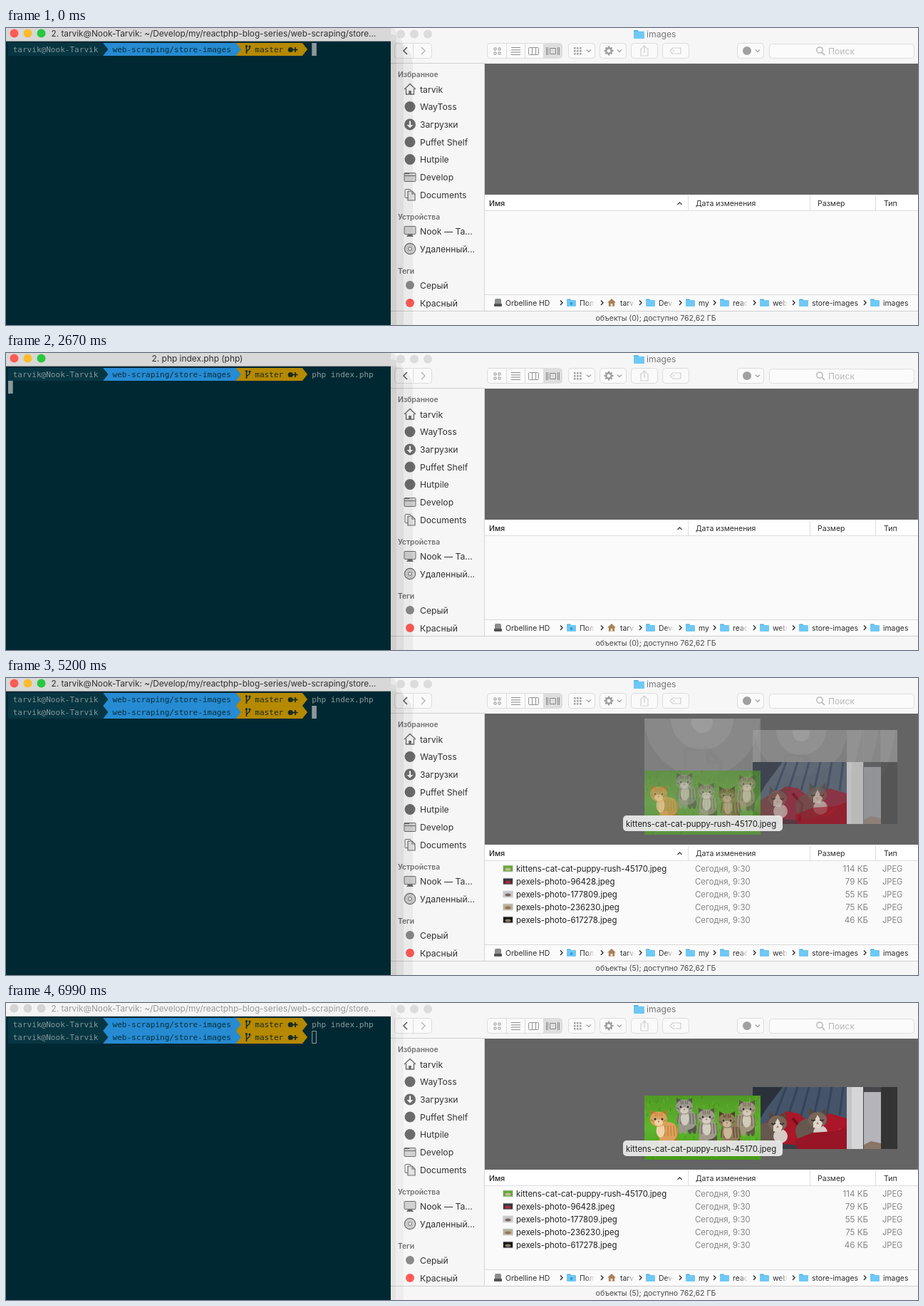
These frames come from a looping animation (1280x417 px, 7.09 s). An HTML page with a canvas:

```html
<!DOCTYPE html>
<html lang="ru">
<head>
<meta charset="utf-8">
<title>Terminal and file list</title>
<style>
  html, body { margin: 0; width: 100%; height: 100%; overflow: hidden; background: #f6f6f6; }
  canvas { display: block; width: 1280px; height: 417px; }
</style>
</head>
<body>
<canvas id="stage" width="1280" height="417"></canvas>
<script>
const ctx = document.getElementById('stage').getContext('2d');
const LOOP = 7090, CELL = 6.66, TAU = Math.PI * 2;
const UI = 'Inter, "Open Sans", sans-serif';
const MONO = '11.06px "DejaVu Sans Mono", monospace';
const ICON = '#6c6c6c', FAINT = '#a6a6a6';
const USER = 'tarvik', HOST = 'Nook-Tarvik';
const PATH_TITLE = `2. ${USER}@${HOST}: ~/Develop/my/reactphp-blog-series/web-scraping/store…`;

// Latest value whose start time has passed
const at = (t, steps) => steps.filter(([start]) => t >= start).pop()[1];

function rect(x, y, w, h, fill, stroke, r = 0) {
  ctx.beginPath();
  ctx.roundRect(x, y, w, h, r);
  paint(fill, stroke);
}
function paint(fill, stroke, width = 1) {
  if (fill) { ctx.fillStyle = fill; ctx.fill(); }
  if (stroke) { ctx.strokeStyle = stroke; ctx.lineWidth = width; ctx.stroke(); }
}
function oval(x, y, rx, ry, fill, stroke, width) {
  ctx.beginPath();
  ctx.ellipse(x, y, rx, ry, 0, 0, TAU);
  paint(fill, stroke, width);
}
const disc = (x, y, r, fill, stroke, width) => oval(x, y, r, r, fill, stroke, width);
function trace(points) {
  ctx.beginPath();
  for (let i = 0; i < points.length; i += 2) ctx.lineTo(points[i], points[i + 1]);
}
function line(color, width, ...points) { trace(points); paint(null, color, width); }
function shape(fill, ...points) { trace(points); ctx.closePath(); paint(fill); }
function text(str, x, y, size, color = '#2b2b2b', align = 'left', weight = 400) {
  ctx.font = `${weight} ${size}px ${UI}`;
  ctx.fillStyle = color;
  ctx.textAlign = align;
  ctx.fillText(str, x, y);
}
function mono(str, col, y, color) {
  ctx.font = MONO;
  ctx.fillStyle = color;
  ctx.textAlign = 'left';
  ctx.fillText(str, 3 + col * CELL, y);
}
function clipped(x, y, w, h, draw) {
  ctx.save();
  ctx.beginPath();
  ctx.rect(x, y, w, h);
  ctx.clip();
  draw();
  ctx.restore();
}
function faded(alpha, draw) {
  ctx.save();
  ctx.globalAlpha *= alpha;
  draw();
  ctx.restore();
}

/* ---------- terminal ---------- */
function prompt(y) {
  const mid = y + 9, base = y + 13;
  const segment = (from, to, fill) => {
    const a = 3 + from * CELL, b = 3 + to * CELL;
    shape(fill, a, y, b, y, b + CELL + 0.5, mid, b, y + 18, a, y + 18);
  };
  segment(47, 62, '#b58900');
  segment(19, 48, '#268bd2');
  segment(0, 20, '#073642');
  mono(`${USER}@${HOST}`, 1, base, '#839496');
  mono('web-scraping/store-images', 22, base, '#052f3d');
  mono('master', 52, base, '#1b2b22');
  line('#1b2b22', 1.6, 337.5, y + 4, 337.5, y + 15);
  line('#1b2b22', 1.4, 342, y + 5, 342, y + 8, 337.5, y + 12);
  disc(337.5, y + 4.5, 1.6, '#1b2b22');
  disc(342, y + 5, 1.6, '#1b2b22');
  disc(399.3, mid + 0.5, 3.6, '#1b2b22');
  line('#1b2b22', 1.8, 402, mid + 0.5, 409.5, mid + 0.5);
  line('#1b2b22', 1.8, 406, mid - 3, 406, mid + 4);
}

function terminal(t) {
  const active = t < 6990, running = t >= 1780, done = t >= 4760;
  rect(0, 0, 540, 417, '#002833');
  rect(0, 0, 540, 18, active ? '#d8d8d8' : '#f4f4f4');
  rect(0, 18, 540, 1, active ? '#8f9a9c' : '#c3c9ca');
  ['#ff5b54', '#fdbc2d', '#28c83f'].forEach((c, i) =>
    disc(11.5 + i * 19, 7.5, 6, active ? c : '#d5d5d5'));

  const title = at(t, [[0, PATH_TITLE], [1780, '2. php index.php (zsh)'],
    [2670, '2. php index.php (php)'], [4310, PATH_TITLE]]);
  const ink = active ? '#303030' : '#9a9a9a';
  if (title === PATH_TITLE) text(title, 63.5, 12, 11.8, ink);
  else text(title, 268.5, 12, 11.9, ink, 'center');

  const typed = at(t, [[0, ''], [600, 'p'], [740, 'ph'], [890, 'php '],
    [1180, 'php in'], [1330, 'php index.php ']]);
  prompt(21);
  mono(typed, 64, 34, '#8d9c9c');
  if (done) prompt(39);
  const col = done ? 64 : running ? 0 : 64 + typed.length;
  const x = 3 + col * CELL, y = running ? 39 : 21;
  if (active) rect(x, y, CELL, 18, '#8b9899');
  else rect(x + 0.5, y + 0.5, CELL - 1, 17, null, '#93a1a1');
}

/* ---------- file window ---------- */
function folder(x, y, w = 13) {
  const h = w * 0.8;
  rect(x, y, w * 0.45, h * 0.4, '#4fb2e6', null, 1);
  rect(x, y + h * 0.14, w, h * 0.86, '#6fc8f5', null, 1);
}
function house(x, y, s, color, fill) {
  const p = [x - 8 * s, y, x, y - 7.5 * s, x + 8 * s, y];
  const walls = [x - 5.5 * s, y - 1, x - 5.5 * s, y + 7 * s, x + 5.5 * s, y + 7 * s, x + 5.5 * s, y - 1];
  if (fill) { shape(color, ...p); shape(color, ...walls); }
  else { line(color, 1.4, ...p); line(color, 1.4, ...walls); }
  rect(x - 1.8 * s, y + 2 * s, 3.6 * s, 5 * s, fill ? '#f2e6d5' : color);
}
const caret = (x, y, color) => line(color, 1.4, x - 3, y - 1.5, x, y + 1.5, x + 3, y - 1.5);
const button = (x, w, fill = '#fafafa') => rect(x + 0.5, 21.5, w, 21, fill, '#dcdcdc', 4);
function dots(x, y, color) {
  for (let i = 0; i < 9; i++) rect(x + i % 3 * 4, y + (i / 3 | 0) * 4, 2.6, 2.6, color);
}

function toolbar() {
  rect(540, 0, 740, 50, '#f6f6f6');
  [554, 573, 592].forEach(x => disc(x, 8.5, 6, '#dcdcdc'));
  folder(881, 3, 15);
  text('images', 899, 13, 12.2, '#777');

  button(545, 52);
  rect(571, 22, 1, 21, '#dcdcdc');
  line('#555', 1.5, 563, 27, 558, 32, 563, 37);
  line('#b9b9b9', 1.5, 583, 27, 588, 32, 583, 37);

  button(675, 105);
  rect(754, 22, 26, 20, '#dedede');
  [702, 728, 754].forEach(x => rect(x, 22, 1, 20, '#dcdcdc'));
  [0, 1, 2, 3].forEach(i => rect(685 + i % 2 * 6, 28 + (i >> 1) * 6, 3, 3, null, '#9a9a9a'));
  for (let i = 0; i < 4; i++) rect(709, 27 + i * 3.3, 13, 1, '#8b8b8b');
  rect(733.5, 27.5, 14, 10, null, '#949494', 1);
  rect(738, 28, 1, 10, '#949494');
  rect(743, 28, 1, 10, '#949494');
  rect(763.5, 28.5, 8, 8, null, '#858585');
  [758, 760, 774, 776].forEach(x => rect(x, 27, 1, 11, '#858585'));

  button(789, 37);
  dots(797, 27, FAINT);
  caret(818, 32, FAINT);

  button(833, 37);
  for (let i = 0; i < 8; i++) {
    const a = i * TAU / 8, c = Math.cos(a), s = Math.sin(a);
    line('#9d9d9d', 2.2, 846 + c * 4, 32 + s * 4, 846 + c * 6.5, 32 + s * 6.5);
  }
  disc(846, 32, 3.7, null, '#9d9d9d', 2.4);
  caret(861, 32, FAINT);

  button(877, 37);
  line('#cfcfcf', 1.2, 893, 29, 891, 29, 891, 39, 901, 39, 901, 29, 899, 29);
  line('#cfcfcf', 1.2, 896, 35, 896, 25);
  line('#cfcfcf', 1.2, 893, 28, 896, 25, 899, 28);

  button(921, 37);
  line('#cfcfcf', 1.2, 932, 32, 936, 28, 947, 28, 947, 36, 936, 36, 932, 32);
  disc(937, 32, 1, '#cfcfcf');

  button(1026, 37);
  disc(1040, 32, 6, '#a0a0a0');
  caret(1055, 32, FAINT);

  rect(1071.5, 22.5, 203, 20, '#fbfbfb', '#dedede', 4);
  disc(1142, 31, 4.2, null, '#b0b0b0', 1.3);
  line('#b0b0b0', 1.4, 1145, 34, 1149, 38);
  text('Поиск', 1154, 37, 12.2, '#b9b9b9');
}

function sidebar() {
  rect(540, 50, 132, 347, '#f6f6f6');
  rect(540, 49, 132, 1, '#cfcfcf');
  rect(671, 50, 1, 347, '#d4d4d4');
  const heading = (str, y) => text(str, 550, y, 10.3, '#727272', 'left', 600);
  heading('Избранное', 68.5);
  heading('Устройства', 268.5);
  heading('Теги', 344.5);
  const row = (str, y) => text(str, 581, y + 4.5, 12.2, '#333');
  [USER, 'WayToss', 'Загрузки', 'Puffet Shelf', 'Hutpile', 'Develop', 'Documents']
    .forEach((name, i) => row(name, 86 + i * 24.7));
  row('Nook — Та…', 285.5);
  row('Удаленный…', 310);
  row('Серый', 361);
  row('Красный', 386);

  house(567, 86, 1, ICON);
  [110.5, 160, 184.5].forEach(y => disc(567, y, 7.5, ICON));
  disc(567, 135.4, 8, ICON);
  line('#f6f6f6', 2.2, 567, 130.5, 567, 138);
  shape('#f6f6f6', 562.5, 136, 571.5, 136, 567, 140.5);
  rect(559, 203.5, 16, 12, '#d2d2d2', ICON, 1);
  rect(559, 203, 7, 2, ICON);
  line(ICON, 1.1, 559, 207.5, 575, 207.5);
  rect(560, 226.5, 8, 12, '#f6f6f6', ICON, 1);
  shape('#e4e4e4', 564, 229, 570, 229, 574, 233, 574, 242, 564, 242);
  line(ICON, 1.2, 564, 229, 570, 229, 574, 233, 574, 242, 564, 242, 564, 229);
  line(ICON, 1.1, 570, 229, 570, 233, 574, 233);
  rect(559, 278.5, 16, 11, '#d2d2d2', ICON, 1);
  shape(ICON, 564, 290, 570, 290, 572, 293, 562, 293);
  disc(567, 310, 7.7, '#cecece', ICON, 1.2);
  disc(567, 310, 2.4, '#f6f6f6', ICON, 1);
  disc(567, 361, 6, '#8b8b8b');
  disc(567, 386, 6, '#ff5c57');
}

function pathbar(count) {
  rect(672, 374, 608, 23, '#fbfbfb');
  rect(672, 374, 608, 1, '#d9d9d9');
  rect(686, 380, 9, 10, '#8b8d90', null, 2);
  rect(685, 387, 11, 4, '#505356', null, 1);
  text('Orbelline HD', 701, 389.5, 10.4);
  const names = [['По', 'ль', 787], ['tar', 'v', 844], ['De', 've', 898], ['my', '', 954],
    ['re', 'act', 1002], ['we', 'b', 1058], ['store-images', '', 1113], ['images', '', 1213]];
  for (const [shown, cut, x] of names) {
    if (cut === 'v') house(x + 6, 385.5, 0.75, '#a98257', true);
    else folder(x, 380.5);
    let ink = '#2b2b2b';
    if (cut) {
      ink = ctx.createLinearGradient(x + 27, 0, x + 39, 0);
      ink.addColorStop(0, '#2b2b2b');
      ink.addColorStop(1, 'rgba(43,43,43,0)');
    }
    text(shown + cut, x + 18, 389.5, 10.4, ink);
    line('#333', 1.4, x - 9, 382.5, x - 6, 385.7, x - 9, 389);
  }
  disc(793.5, 387, 2, '#3d98cc');
  rect(540, 397, 740, 20, '#f6f6f6');
  rect(540, 397, 740, 1, '#d0d0d0');
  text(`объекты (${count}); доступно 762,62 ГБ`, 912, 411, 10.55, '#4b4b4b', 'center');
}

const files = [
  ['kittens-cat-cat-puppy-rush-45170', 114, '#65a83b', '#c8b795'],
  ['pexels-photo-96428', 79, '#343941', '#b22832'],
  ['pexels-photo-177809', 55, '#c9c8ca', '#79665e'],
  ['pexels-photo-236230', 75, '#b7b29c', '#987455'],
  ['pexels-photo-617278', 46, '#171717', '#857c63'],
];

function fileList(t) {
  rect(672, 234, 608, 140, '#fafafa');
  rect(672, 234, 608, 22, '#fff');
  rect(672, 256, 608, 1, '#dedede');
  [957, 1128, 1220].forEach(x => rect(x, 235, 1, 21, '#dedede'));
  text('Имя', 678, 250, 10.5, '#222', 'left', 500);
  line('#444', 1.3, 942.5, 248, 945.5, 245, 948.5, 248);
  text('Дата изменения', 968, 250, 10.5);
  text('Размер', 1139, 250, 10.5);
  text('Тип', 1232, 250, 10.5);
  if (t < 3870) return;

  files.forEach(([name, size, back, front], i) => {
    const y = 267.5 + i * 18, base = y + 4.3;
    if (t < 4610) {
      rect(700.5, y - 6, 9, 12, '#fff', '#c5c5c5');
      rect(702, y, 6, 3.5, '#66717f');
      disc(704, y - 1, 1.5, '#8e9cab');
    } else {
      rect(697.5, y - 4.5, 14, 9, back, '#dadada');
      oval(704.5, y + 1, 4, 2, front);
    }
    text(name + '.jpeg', 716, base, 11.43, '#202020');
    text('Сегодня, 9:30', 967, base, 11.4, '#858585');
    text(`${size} КБ`, 1210, base, 11.6, '#858585', 'right');
    if (t >= 4170) text('JPEG', 1230, base, 11.1, '#858585');
  });
}

/* ---------- preview area ---------- */
// detail: visibility of the light on the sheet, from 0 to 1
function blankPage(x, y, w, h, cx, s, detail) {
  rect(x, y, w, h, '#a8a8a8');
  clipped(x, y, w, h, () => faded(detail, () => {
    disc(cx, y, 81 * s, '#b6b6b6');
    disc(cx, y, 44 * s, '#c2c2c2');
    disc(cx, y + 5 * s, 15 * s, '#dedede');
  }));
}
function pageOutline(x, y, w, h, lineWidth) {
  const fold = w * 0.36, r = x + w;
  line('#777', lineWidth, r - fold, y, x, y, x, y + h, r, y + h, r, y + fold, r - fold, y,
    r - fold, y + fold, r, y + fold);
}
function placeholders(detail) {
  blankPage(1048, 73, 203, 132, 1116, 0.8, detail);
  [['#a2a2a2', 1180], ['#949494', 1203], ['#9f9f9f', 1227]].forEach(([c, x]) => {
    rect(x, 73, 24, 132, c);
    faded(detail, () => {
      shape('#b0b0b0', x, 73, x + 22, 73, x + 10, 126, x, 140);
      rect(x, 73, 1, 132, '#858585');
    });
  });
  faded(detail, () => pageOutline(1094, 109, 42, 60, 4));
  blankPage(896, 57, 163, 163, 977, 1, detail);
  faded(detail, () => pageOutline(953, 100, 50, 75, 5));
}

// lean: how far the body lies to the side of the head
function kitten(x, y, lean, fur, dark, light) {
  const bx = x + lean, soft = dark + '99';
  for (const d of [-9, -3, 4, 10]) oval(bx + d, y + 30, 3.2, 8, d % 2 ? fur : dark);
  oval(bx, y + 18, 14, 14, fur);
  for (let i = -3; i < 4; i++) line(soft, 1.6, bx + i * 4, y + 9, bx + i * 4.5, y + 24);
  oval(x + lean * 0.2, y + 16, 6, 10, light);
  for (const d of [-1, 1]) shape(dark, x + d * 11, y - 13, x + d * 11, y, x + d * 2, y - 8);
  oval(x, y, 12, 10.5, fur);
  for (const d of [-5, -2, 2, 5]) line(soft, 1.4, x + d, y - 9, x + d * 0.8, y - 4);
  for (const d of [-1, 1]) line(soft, 1.4, x + d * 11, y + 1, x + d * 7, y + 3);
  oval(x, y + 5, 6, 4.5, light);
  for (const d of [-5, 5]) {
    disc(x + d, y, 2.3, light);
    disc(x + d, y, 1.7, '#30332e');
  }
  disc(x, y + 3.5, 1.1, '#a86c62');
}
function kittenPhoto() {
  const grass = ctx.createLinearGradient(0, 130, 0, 220);
  grass.addColorStop(0, '#4f9a24');
  grass.addColorStop(0.5, '#5fb52e');
  grass.addColorStop(1, '#469b17');
  rect(896, 130, 163, 90, grass);
  let seed = 7;
  const random = () => (seed = seed * 16807 % 2147483647) / 2147483647;
  for (let i = 0; i < 150; i++) {
    const x = 896 + random() * 163, y = 134 + random() * 86;
    line(i % 2 ? 'rgba(40,112,12,.35)' : 'rgba(130,199,70,.4)', 1, x, y, x + random() * 4 - 2, y - 5);
  }
  kitten(1040, 149, -2, '#a0957f', '#5f5849', '#d3cab8');
  kitten(952, 146, 4, '#9a988c', '#55554e', '#cfcabd');
  kitten(916, 163, 13, '#dca05c', '#b9742f', '#efd2a6');
  kitten(983, 160, 2, '#a19a8b', '#5b554b', '#d5cfc2');
  kitten(1012, 165, 5, '#8f7a5a', '#4d3e2a', '#c9b797');
}
function sleepingCat(x, y) {
  oval(x - 11, y + 16, 20, 18, '#66584f');
  oval(x + 4, y + 18, 10, 10, '#d6cdc6');
  for (const d of [-1, 1]) shape('#54463e', x + d * 12, y + 1, x + d * 11, y - 17, x + d * 2, y - 8);
  oval(x, y, 13, 11, '#766558');
  shape('#ded5cc', x, y - 7, x + 7, y + 5, x + 4, y + 12, x - 6, y + 11, x - 6, y + 4);
  for (const d of [-6, 6]) line('#332c29', 1.4, x + d - 3, y, x + d, y + 1.5, x + d + 3, y);
  disc(x, y + 5, 1.4, '#b57870');
}
function photos() {
  clipped(1048, 118, 132, 87, () => {
    rect(1048, 118, 132, 87, '#46546a');
    shape('#2b313a', 1048, 118, 1090, 118, 1066, 150, 1048, 180);
    for (let i = 0; i < 6; i++) line('#36435a', 3, 1095 + i * 16, 118, 1080 + i * 18, 158);
    shape('#a91728', 1058, 172, 1096, 152, 1112, 155, 1128, 168, 1156, 155, 1180, 162, 1180, 205, 1058, 205);
    line('#710e1b', 4, 1104, 162, 1118, 178, 1113, 202);
    line('#cb2e3d', 3, 1150, 194, 1172, 177);
    sleepingCat(1083, 169);
    sleepingCat(1139, 164);
    shape('#971524', 1108, 192, 1132, 182, 1164, 180, 1180, 174, 1180, 205, 1108, 205);
    shape('#3a3c43', 1048, 184, 1064, 196, 1108, 199, 1112, 205, 1048, 205);
  });
  rect(1180, 118, 24, 87, '#d6d6d8');
  rect(1180, 118, 7, 87, '#c5c5c9');
  rect(1203, 118, 25, 87, '#45474a');
  clipped(1204, 125, 24, 80, () => {
    rect(1204, 125, 24, 80, '#b4b4ba');
    shape('#8a7566', 1204, 199, 1214, 194, 1228, 197, 1228, 205, 1204, 205);
  });
  rect(1228, 118, 23, 87, '#343434');
  kittenPhoto();
}

function preview(t) {
  rect(672, 50, 608, 184, '#646464');
  if (t < 3870) return;
  const step = t < 5060 ? 0 : Math.min(6, Math.floor((t - 5055) / 145) + 1);
  const rest = (1 - step / 6) ** 2.3;
  if (rest > 0) faded(rest, () => placeholders(rest));
  if (rest < 1) faded(1 - rest, photos);
  rect(866, 193, 224, 22, 'rgba(232,232,232,.96)', null, 5);
  text('kittens-cat-cat-puppy-rush-45170.jpeg', 870, 208.6, 11.43, '#1d1d1d');
}

function windowShadow(active) {
  const bands = active ? [[571, 0.05, 18], [558, 0.055, 9], [548, 0.06, 0]] : [[558, 0.03, 12], [547, 0.045, 2]];
  for (const [right, alpha, top] of bands) {
    rect(540, top, right - 540, 440, `rgba(0,0,0,${alpha})`, null, [0, right - 540, 0, 0]);
  }
}

function frame(now) {
  const t = now % LOOP;
  toolbar();
  sidebar();
  preview(t);
  fileList(t);
  pathbar(t < 3870 ? 0 : 5);
  windowShadow(t < 6990);
  terminal(t);
}

let start;
function tick(now) {
  start ??= now;
  frame(now - start);
  requestAnimationFrame(tick);
}
requestAnimationFrame(tick);
</script>
</body>
</html>
```
